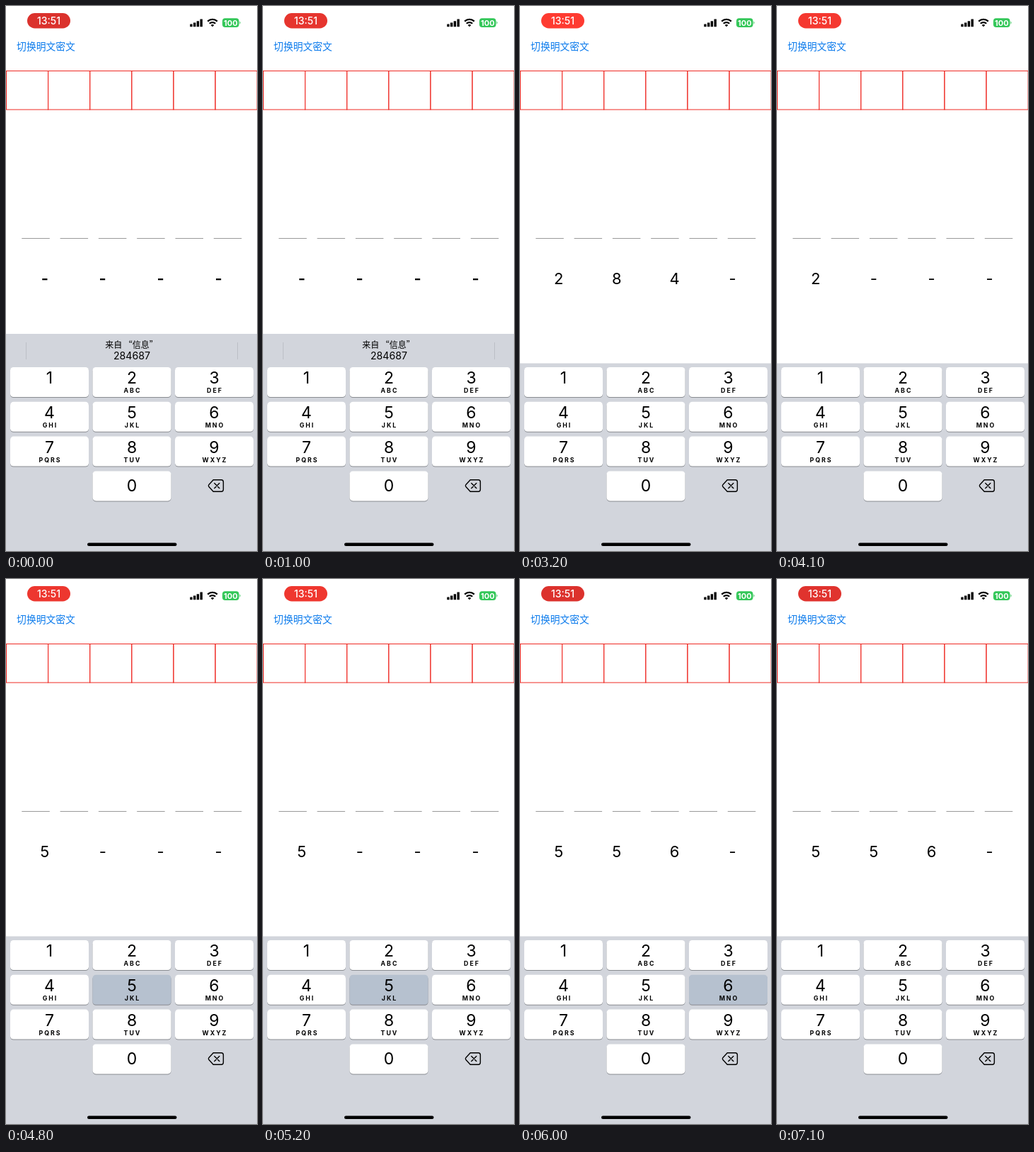
Recreate the animation shown at these times as an HTML page. Size 355x768 px, loop 7200 ms.

```html
<!DOCTYPE html>
<html lang="zh">
<head>
<meta charset="utf-8">
<style>
html, body { margin: 0; width: 100%; height: 100%; overflow: hidden; background: #fff; }
svg { display: block; width: 355px; height: 768px; }
text { font-family: Inter, "Noto Sans CJK SC", "Noto Sans CJK", sans-serif; text-anchor: middle; }
.cjk { font-family: "Noto Sans CJK SC", "Noto Sans CJK", sans-serif; }
.num { font-size: 23px; }
.abc { font-size: 8.8px; font-weight: 700; letter-spacing: 2px; }
</style>
</head>
<body>
<svg id="stage" viewBox="0 0 355 768">
  <rect id="pill" x="30" y="10" width="61" height="21.5" rx="10.7"/>
  <text x="60.5" y="25.7" font-size="14" font-weight="500" fill="#fff">13:51</text>
  <path d="M262 29.2v-3.8M266.7 29.2v-5.6M271.4 29.2v-8M276.2 29.2v-10.8" stroke="#000" stroke-width="3.4"/>
  <g fill="none" stroke="#000" stroke-width="2.3">
    <path d="M285.2 21.7a9.8 9.8 0 0 1 13.6 0M287.8 24.8a6 6 0 0 1 8.4 0"/>
    <path d="M289.6 26.9q2.4-1.9 4.8 0L292 29.3z" fill="#000" stroke="none"/>
  </g>
  <rect x="306" y="17.3" width="23.5" height="12.7" rx="4" fill="#34c759"/>
  <path d="M330.5 21.6q2.2 2 0 4.2z" fill="#34c759"/>
  <text x="317.8" y="27.7" font-size="11" font-weight="700" fill="#fff">100</text>
  <text class="cjk" x="56.5" y="62" font-size="13.8" fill="#0a7aec">切换明文密文</text>
  <g id="cells" fill="none" stroke="#ef2b25"></g>
  <g id="lines" stroke="#999"></g>
  <g id="code" font-size="22"></g>
  <rect id="board" width="355" height="306" fill="#d2d5dc"/>
  <g id="bar">
    <path d="M28.5 474v24M327.5 474v24" stroke="#bcbfc6"/>
    <text class="cjk" x="177.5" y="481.7" font-size="12">来自 “信息”</text>
    <text x="178" y="498" font-size="14.2">284687</text>
  </g>
  <g id="keys"></g>
  <path id="erase" d="M293.2 667.8H304.5Q307.4 667.8 307.4 670.7V681.3Q307.4 684.2 304.5 684.2H293.2L287 677.6Q285.6 676 287 674.4Z" stroke="#000" stroke-width="1.4" stroke-linejoin="round"/>
  <path id="cross" d="M294.8 672.5l7 7m0-7l-7 7" stroke-width="1.4" stroke-linecap="round"/>
  <rect x="115" y="756.5" width="126.5" height="4.5" rx="2.25"/>
</svg>
<script>
const $ = id => document.getElementById(id);
const LOOP = 7200, STEP = 100;

const repeat = (n, make) => Array.from({ length: n }, (_, i) => make(i)).join('');

$('cells').innerHTML = repeat(6, i =>
  `<rect x="${0.5 + i * 59.1}" y="91.5" width="59.1" height="54.5"/>`);
$('lines').innerHTML = repeat(6, i => `<path d="M${22.3 + i * 54.3} 327.5h39.5"/>`);
$('code').innerHTML = repeat(4, i => `<text x="${54.8 + i * 81.9}" y="392.3"></text>`);

const letters = ['', 'ABC', 'DEF', 'GHI', 'JKL', 'MNO', 'PQRS', 'TUV', 'WXYZ'];
const key = (digit, col, row, label) => {
  const x = 6 + col * 116.5, y = 509 + row * 48.8, mid = x + 55.5;
  return `<rect x="${x}" y="${y + 1}" width="111" height="42" rx="4.6" fill="#898c91"/>
    <rect id="key${digit}" x="${x}" y="${y}" width="111" height="42" rx="4.6"/>
    <text class="num" x="${mid}" y="${y + (digit ? 23 : 29)}">${digit}</text>
    <text class="abc" x="${mid + 1}" y="${y + 36}">${label}</text>`;
};
$('keys').innerHTML =
  letters.map((label, i) => key(i + 1, i % 3, Math.floor(i / 3), label)).join('') + key(0, 1, 3, '');

// [time, entered code]
const entries = [[0, ''], [1200, '2846'], [2900, '284'], [3400, '28'], [3800, '2'],
  [4200, ''], [4700, '5'], [5300, '55'], [5900, '556']];
// [key, down, up]
const presses = [['erase', 2900, 3100], ['erase', 3400, 3600], ['erase', 3800, 4000],
  ['erase', 4200, 4400], ['key5', 4700, 4900], ['key5', 5200, 5400], ['key6', 5900, 6100]];
// [time, brightness of the recording pill]
const glow = [[0, 0.08], [1700, 0.55], [3200, 0.98], [4800, 0.55], [5200, 0.58], [6000, 0.1], [7200, 0.22]];

function glowAt(t) {
  const i = glow.findIndex(([time]) => time > t);
  const [t0, v0] = glow[i - 1], [t1, v1] = glow[i];
  return v0 + (v1 - v0) * (t - t0) / (t1 - t0);
}

function render(t) {
  const v = glowAt(t);
  $('pill').setAttribute('fill', `rgb(${216 + 39 * v}, ${49 + 10 * v}, ${45 + 4 * v})`);

  const code = entries.filter(([time]) => time <= t).pop()[1];
  const offered = t < entries[1][0];
  [...$('code').children].forEach((el, i) => el.textContent = code[i] || '-');
  $('code').setAttribute('font-weight', offered ? 600 : 400);
  $('board').setAttribute('y', offered ? 462 : 503.5);
  $('bar').setAttribute('visibility', offered ? 'visible' : 'hidden');

  const down = id => presses.some(([k, from, to]) => k === id && t >= from && t < to);
  for (let d = 0; d < 10; d++) $('key' + d).setAttribute('fill', down('key' + d) ? '#b6c1cf' : '#fff');
  $('erase').setAttribute('fill', down('erase') ? '#000' : 'none');
  $('cross').setAttribute('stroke', down('erase') ? '#d2d5dc' : '#000');
}

function tick() {
  render(Math.floor(performance.now() % LOOP / STEP) * STEP);
  requestAnimationFrame(tick);
}
tick();
</script>
</body>
</html>
```
